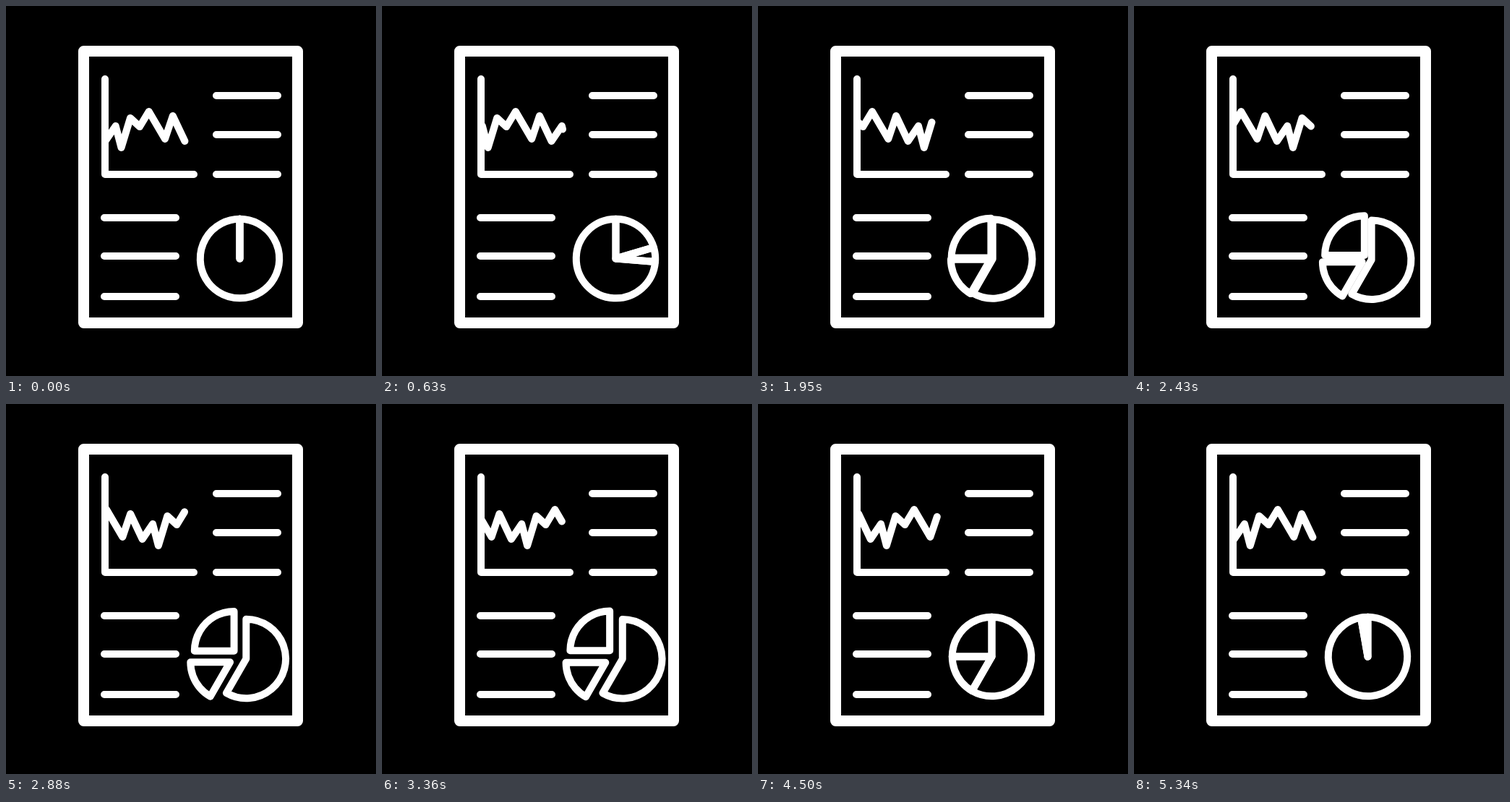
An HTML page that plays this animation: 512 by 512 pixels, repeating every 5.37 s.

```html
<!DOCTYPE html>
<html lang="en">
<head>
<meta charset="utf-8">
<title>Report icon</title>
<style>
  html, body { margin: 0; width: 100%; height: 100%; overflow: hidden; background: #000; }
  svg { display: block; width: 100%; height: 100%; }
</style>
</head>
<body>
<svg viewBox="0 0 512 512" fill="none" stroke="#fff" stroke-width="10" stroke-linecap="round" stroke-linejoin="round">
  <clipPath id="plot"><rect x="137" y="90" width="140" height="140"/></clipPath>
  <rect x="107.5" y="62.5" width="296" height="376" stroke-width="15"/>
  <path d="M291 124H376M291 178H376M291 233H376M136 293H235M136 346H235M136 402H235"/>
  <g clip-path="url(#plot)"><path id="wave"/></g>
  <path d="M137 101V233H260"/>
  <path id="big"/>
  <path id="small"/>
  <path id="quarter"/>
</svg>
<script>
  const LOOP = 5370, STEP = 30, CYCLE = 5400;
  const OPENED = 1800, APART = 3150, JOINED = 4500;
  const CENTER = { x: 323.5, y: 349.6 }, RADIUS = 54.75;
  const PERIOD = 110;
  const SHAPE = [[137.4, 187], [151.7, 166], [159.5, 196], [172, 155], [185, 167],
                 [197.7, 146], [220, 184], [230.8, 152]];

  const byId = id => document.getElementById(id);
  const wave = byId('wave');

  // Two periods of the graph, so it can scroll by one whole period.
  const points = [0, 1, 2].flatMap(k => SHAPE.map(([x, y]) => [x + k * PERIOD, y]))
    .slice(0, 2 * SHAPE.length + 1);
  wave.setAttribute('d', 'M' + points.join('L'));

  const periodLength = SHAPE.reduce((sum, [x, y], i) =>
    sum + Math.hypot(points[i + 1][0] - x, points[i + 1][1] - y), 0);

  // Each slice has its drift at full separation.
  const slices = [
    { node: byId('big'), dx: 11, dy: 3.6 },
    { node: byId('small'), dx: -16.8, dy: 9.7 },
    { node: byId('quarter'), dx: -9.9, dy: -9.9 }
  ];

  const lerp = (a, b, t) => a + (b - a) * t;
  const clamp = v => Math.min(1, Math.max(0, v));

  function rim(degrees) {
    const a = degrees * Math.PI / 180;
    return `${CENTER.x + RADIUS * Math.sin(a)} ${CENTER.y - RADIUS * Math.cos(a)}`;
  }

  function slicePath(from, to) {
    const arcTo = angle => `A${RADIUS} ${RADIUS} 0 0 1 ${rim(angle)}`;
    const third = (to - from) / 3;
    return `M${CENTER.x} ${CENTER.y}L${rim(from)}` +
      arcTo(from + third) + arcTo(from + 2 * third) + arcTo(to) + 'Z';
  }

  function drawWave(t) {
    const u = t / CYCLE;
    wave.setAttribute('transform', `translate(${-PERIOD * u} 0)`);
    wave.setAttribute('stroke-dasharray', `${periodLength * (1 + u)} ${periodLength * 3}`);
  }

  function drawPie(t) {
    const open = clamp(t / OPENED);
    const close = clamp((t - JOINED) / (CYCLE - JOINED));
    const apart = clamp(1 - Math.abs(t - APART) / (APART - OPENED));
    const cuts = [0, lerp(210 * open, 360, close), lerp(270 * open, 360, close), 360];
    slices.forEach(({ node, dx, dy }, i) => {
      node.setAttribute('d', slicePath(cuts[i], cuts[i + 1]));
      node.setAttribute('transform', `translate(${dx * apart} ${dy * apart})`);
    });
  }

  function render(ms) {
    const t = Math.floor((ms % LOOP) / STEP) * STEP;
    drawWave(t);
    drawPie(t);
  }

  const start = performance.now();
  function tick() {
    render(performance.now() - start);
    requestAnimationFrame(tick);
  }
  tick();
</script>
</body>
</html>
```
